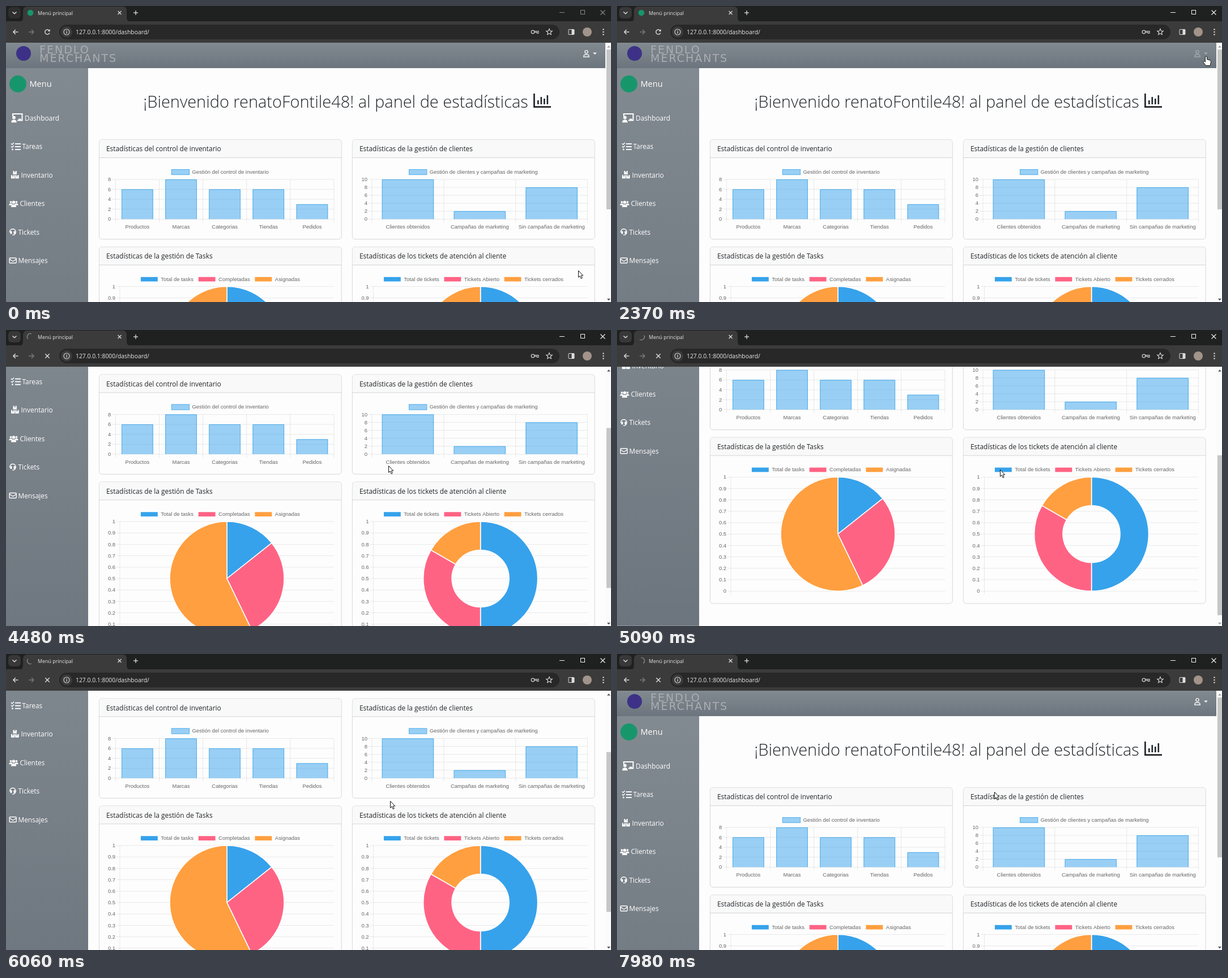
Recreate the animation shown at these times as an HTML page with a canvas. Size 1068 by 524 pixels, loop 8 s.

```html
<!DOCTYPE html>
<html lang="es">
<head>
<meta charset="utf-8">
<title>Menú principal</title>
<style>
html, body { margin: 0; width: 100%; height: 100%; overflow: hidden; background: #1f1f1f; }
canvas { display: block; }
</style>
</head>
<body>
<canvas id="stage" width="1068" height="524"></canvas>
<script>
const c = document.getElementById('stage').getContext('2d');
const LOOP = 8000, TAU = Math.PI * 2;
const UI = '"Open Sans", "Noto Sans", sans-serif';
const ARIAL = '"Liberation Sans", Arial, sans-serif';
const USER = 'renatoFontile48';
const INK = '#212529', BLUE = '#36a2eb', PINK = '#ff6384', ORANGE = '#ff9f40';
const PX = 0.7875; // the page is shown at this zoom
const NOTCH = 100 * PX;
const LEFT = 164, RIGHT = 611, HALF = 214;

// [time, x, y] of the pointer tip
const POINTER = [
  [0, 1010, 468], [70, 1010, 469], [300, 1009, 471], [510, 1008, 473], [790, 1007, 472],
  [900, 980, 435], [1050, 870, 370], [1200, 722, 322], [1300, 780, 310], [1400, 880, 276],
  [1480, 950, 215], [1530, 995, 155], [1620, 1000, 148], [1850, 1026, 122], [2220, 1040, 89],
  [2900, 1040, 89], [3490, 998, 144], [3850, 998, 144], [4400, 675, 240], [4900, 675, 240],
  [5450, 678, 260], [6200, 678, 260], [6610, 667, 243], [7000, 666, 244]
];
// [time, wheel notches]
const SCROLL = [
  [3950, 0], [4300, 2], [4600, 2], [4800, 3], [5200, 3], [5400, 2], [6690, 2], [6980, 0]
];

const smooth = k => k * k * (3 - 2 * k);

function at(keys, t, ease = k => k) {
  if (t <= keys[0][0]) return keys[0].slice(1);
  for (let i = 1; i < keys.length; i++) {
    const a = keys[i - 1], b = keys[i];
    if (t < b[0]) {
      const k = ease((t - a[0]) / (b[0] - a[0]));
      return a.slice(1).map((v, j) => v + (b[j + 1] - v) * k);
    }
  }
  return keys[keys.length - 1].slice(1);
}

function text(s, x, y, size, color, font = UI, align = 'left', weight = 400) {
  c.font = `${weight} ${size}px ${font}`;
  c.textAlign = align;
  c.fillStyle = color;
  c.fillText(s, x, y);
}
const label = (s, x, mid, align) => text(s, x, mid + 3.4, 9.45, '#666', ARIAL, align);

function rect(x, y, w, h, color) {
  c.fillStyle = color;
  c.fillRect(x, y, w, h);
}

function round(x, y, w, h, r, fill, stroke, width = 1) {
  c.beginPath();
  c.roundRect(x, y, w, h, r);
  if (fill) { c.fillStyle = fill; c.fill(); }
  if (stroke) { c.strokeStyle = stroke; c.lineWidth = width; c.stroke(); }
}

function disc(x, y, r, color) {
  c.beginPath();
  c.arc(x, y, r, 0, TAU);
  c.fillStyle = color;
  c.fill();
}

function ring(x, y, r, color, width = 1.2, from = 0, to = TAU) {
  c.beginPath();
  c.arc(x, y, r, from, to);
  c.strokeStyle = color;
  c.lineWidth = width;
  c.stroke();
}

function line(points, color, width = 1) {
  c.beginPath();
  for (let i = 0; i < points.length; i += 2) c.lineTo(points[i], points[i + 1]);
  c.strokeStyle = color;
  c.lineWidth = width;
  c.stroke();
}

function path(x, y, d, fill, stroke, width = 1) {
  const p = new Path2D(d);
  c.save();
  c.translate(x, y);
  if (fill) { c.fillStyle = fill; c.fill(p); }
  if (stroke) { c.strokeStyle = stroke; c.lineWidth = width; c.stroke(p); }
  c.restore();
}

function person(x, y, s, color) {
  disc(x, y - 3.2 * s, 3 * s, color);
  path(x, y, `M${-5 * s} ${6 * s}Q${-5 * s} ${0.8 * s} 0 ${0.8 * s}Q${5 * s} ${0.8 * s} ${5 * s} ${6 * s}Z`, color);
}

function cross(x, y, r, color, width) {
  line([x - r, y - r, x + r, y + r], color, width);
  line([x - r, y + r, x + r, y - r], color, width);
}

function star(x, y, r, color) {
  c.beginPath();
  for (let i = 0; i < 10; i++) {
    const a = i * Math.PI / 5 - Math.PI / 2, q = i % 2 ? r * 0.45 : r;
    c.lineTo(x + q * Math.cos(a), y + q * Math.sin(a));
  }
  c.closePath();
  c.strokeStyle = color;
  c.lineWidth = 1.1;
  c.stroke();
}

/* ---------- browser frame ---------- */

function browser(t) {
  const active = t >= 2370, loading = t >= 3800;
  const pale = '#dedede', win = active ? '#f4f4f4' : '#8a8a8a';
  rect(0, 0, 1068, 28, '#1f2020');
  rect(0, 27, 1068, 38, '#3b3b3b');

  round(4, 2, 22, 20, 6, active ? '#383838' : '#2e2e2e');
  line([11.5, 10.5, 15, 13.8, 18.5, 10.5], pale, 1.4);
  path(0, 0, 'M23 28Q30 28 30 20V9Q30 1 38 1H206Q213 1 213 9V20Q213 28 220 28Z', '#3b3b3b');
  if (loading) {
    const mid = (215 - 360 * (t - 4480) / 1320) * Math.PI / 180;
    ring(43, 12, 5.6, '#8b8d90', 1.3, mid - 1.3, mid + 1.3);
  } else disc(43, 12, 5.3, '#17966c');
  text('Menú principal', 56, 15.6, 8.9, '#e6e6e6');
  cross(200.5, 12, 3, '#dcdcdc', 1.2);
  line([225, 12, 233, 12], pale, 1.3);
  line([229, 8, 229, 16], pale, 1.3);

  line([977, 11.5, 986, 11.5], win);
  c.strokeStyle = win;
  c.strokeRect(1014.5, 7.5, 7, 7);
  cross(1053.5, 11.5, 4, win, 1.1);

  line([21.5, 46, 13, 46], pale, 1.4);
  line([16.8, 42, 12.8, 46, 16.8, 50], pale, 1.4);
  line([40, 46, 48.5, 46], '#7d7d7d', 1.4);
  line([45, 42, 49, 46, 45, 50], '#7d7d7d', 1.4);
  if (loading) cross(73, 46, 3.7, pale, 1.4);
  else {
    ring(73, 46, 4.2, pale, 1.4, 0.4, 5.5);
    path(74.3, 41, 'M3.4 0V4H-0.6Z', pale);
  }

  round(94, 33, 883, 26, 13, '#282828');
  disc(107, 46, 10, '#3b3b3b');
  ring(107, 46, 5, pale, 1.1);
  rect(106.4, 45.3, 1.3, 3.3, pale);
  rect(106.4, 43.2, 1.3, 1.3, pale);
  text('127.0.0.1:8000/dashboard/', 123, 49.6, 10.35, '#e8e8e8');

  ring(930, 46, 2.8, '#c6c6c6', 1.3);
  path(933, 44.6, 'M0 0H7V3.6H4.4V2H0', null, '#c6c6c6', 1.2);
  star(959, 46, 5.6, pale);
  round(993, 41.5, 10, 9, 1, null, pale);
  rect(998.5, 41.5, 4.5, 9, pale);
  disc(1026, 46, 8, '#a2948a');
  for (const y of [41.5, 46, 50.5]) disc(1054.5, y, 1.2, pale);
}

/* ---------- page ---------- */

function shade(x, y, w, h) {
  const g = c.createLinearGradient(0, y, 0, y + h);
  g.addColorStop(0, '#828a91');
  g.addColorStop(1, '#6c757d');
  rect(x, y, w, h, g);
}

function navbar(t) {
  shade(0, 65, 1058, 45);
  disc(31, 84, 13, '#3c3187');
  c.letterSpacing = '2px';
  const type = '"DejaVu Sans", sans-serif';
  text('FENDLO', 59, 84, 19, '#aaaeb1', type);
  text('MERCHANTS', 59, 99, 19, '#aaaeb1', type);
  c.letterSpacing = '0px';

  const color = t < 2180 || t >= 3850 ? '#f3f4f5' : t < 2630 ? '#a3a8ad' : '#14171a';
  ring(1024.5, 81.2, 2.6, color, 1.4);
  path(1024.5, 90, 'M-4.8 0Q-4.8-4-1.5-4H1.5Q4.8-4 4.8 0Z', null, color, 1.4);
  path(1036, 82.5, 'M0 0H7L3.5 3.6Z', color);
}

function sidebar() {
  const w = '#fff';
  shade(0, 110, 145, 650);
  disc(21, 138, 15, '#17966c');
  text('Menu', 41.5, 142.5, 14.5, w);
  const items = [['Dashboard', 33], ['Tareas', 28.5], ['Inventario', 26.5], ['Clientes', 24.5], ['Tickets', 21.5], ['Mensajes', 21.5]];
  items.forEach(([s, x], i) => text(s, x, 203 + i * 50.4, 11.85, w));

  line([12, 195, 12, 191, 28.5, 191, 28.5, 202.5, 20, 202.5], w, 2);
  rect(22, 199.5, 4.5, 3, w);
  person(14, 200.5, 0.95, w);

  for (let i = 0; i < 3; i++) {
    const y = 244 + i * 5;
    rect(16, y - 0.9, 10, 1.9, w);
    if (i < 2) line([9, y - 0.5, 10.8, y + 1.3, 14, y - 2], w, 1.4);
    else disc(11.5, y, 1.4, w);
  }

  for (const [x, y] of [[12.5, 292], [9, 299.3], [16.3, 299.3]]) {
    rect(x, y, 6.4, 6, w);
    rect(x + 2.3, y, 1.8, 2.4, '#7a8289');
  }

  person(8.5, 349, 0.62, w);
  person(18.5, 349, 0.62, w);
  person(13.5, 350.5, 0.92, w);

  ring(12, 400, 5.3, w, 1.4, Math.PI * 0.95, TAU * 1.12);
  round(7.5, 398.5, 3, 5, 1, w);
  round(13.5, 398.5, 3, 5, 1, w);
  line([16.5, 403, 14, 405.3, 11, 405.3], w, 1.3);

  path(6.2, 446, 'M1 0H11Q12 0 12 1V8Q12 9 11 9H1Q0 9 0 8V1Q0 0 1 0ZM0 2L6 6L12 2', null, w, 1.4);
}

function card(x, y, h, title) {
  const edge = '#cbcccd';
  round(x + 0.4, y + 0.4, 2 * HALF - 0.2, h, 5, '#fdfdfd', edge, PX);
  path(x, y, 'M0.8 32V6Q1 0.8 6 0.8H422Q427.4 1 427.4 6V32Z', '#f9f9f9');
  rect(x, y + 32, 2 * HALF, PX, edge);
  text(title, x + 13, y + 21, 11.9, INK);
}

function legend(items, mid, y) {
  c.font = `9.45px ${ARIAL}`;
  const box = 40 * PX, gap = 6 * PX, pad = 10 * PX;
  const widths = items.map(i => box + gap + c.measureText(i[0]).width);
  let x = mid - (widths.reduce((a, b) => a + b) + pad * (items.length - 1)) / 2;
  items.forEach(([s, fill, stroke, width], i) => {
    rect(x, y - 4.7, box, 9.4, fill);
    c.strokeStyle = stroke;
    c.lineWidth = width;
    c.strokeRect(x, y - 4.7, box, 9.4);
    label(s, x + box + gap, y - 0.5);
    x += widths[i] + pad;
  });
}

const GRID = 'rgba(0,0,0,0.1)';
const hline = (x0, x1, y) => rect(x0, y - PX / 2, x1 - x0, PX, GRID);
const vline = (x, y0, y1) => rect(x - PX / 2, y0, PX, y1 - y0, GRID);

function axis(x0, x1, top, bottom, names) {
  names.forEach((s, i) => {
    const y = top + (bottom - top) * i / (names.length - 1);
    hline(x0 - 6, x1, y);
    label(s, x0 - 8, y - 0.3, 'right');
  });
}

function bars(x0, x1, mid, max, title, data) {
  const step = (x1 - x0) / data.length, top = 307, base = 377.3;
  const fill = 'rgba(54,162,235,0.5)', inset = PX / 2;
  const names = [];
  for (let v = max; v >= 0; v -= 2) names.push(String(v));
  axis(x0, x1, top, base, names);
  for (let i = 0; i <= data.length; i++) vline(x0 + i * step, top, base + 6);
  data.forEach(([s, v], i) => {
    const cx = x0 + (i + 0.5) * step, w = step * 0.72, y = base - (base - top) * v / max;
    const l = cx - w / 2 + inset, r = cx + w / 2 - inset;
    rect(cx - w / 2, y, w, base - y, fill);
    line([l, base, l, y + inset, r, y + inset, r, base], BLUE, PX);
    label(s, cx, 391, 'center');
  });
  legend([[title, fill, BLUE, PX]], mid, 294);
}

function pie(x0, x1, mid, hole, data) {
  const cx = (x0 + x1) / 2, cy = 597.5, colors = [BLUE, PINK, ORANGE];
  const names = [];
  for (let i = 10; i >= 0; i--) names.push(String(i / 10));
  axis(x0, x1, 496.5, 698.5, names);
  vline(x0, 496.5, 704.5);
  const sum = data.reduce((a, d) => a + d[1], 0);
  let a = -Math.PI / 2;
  data.forEach(([, v], i) => {
    const b = a + TAU * v / sum;
    c.beginPath();
    c.arc(cx, cy, 101, a, b);
    if (hole) c.arc(cx, cy, hole, b, a, true);
    else c.lineTo(cx, cy);
    c.closePath();
    c.fillStyle = colors[i];
    c.fill();
    c.strokeStyle = '#fff';
    c.lineWidth = 2 * PX;
    c.stroke();
    a = b;
  });
  legend(data.map((d, i) => [d[0], colors[i], '#fff', 2 * PX]), mid, 483.7);
}

function content() {
  text(`¡Bienvenido ${USER}! al panel de estadísticas`, 582, 180, 28.95, INK, UI, 'center', 300);
  line([932.4, 155, 932.4, 178.6, 962, 178.6], INK, 2.7);
  [[938, 167], [943.5, 161], [949, 164], [954.5, 158]].forEach(([x, y]) => rect(x, y, 2.6, 174 - y, INK));

  card(LEFT, 236, 176.4, 'Estadísticas del control de inventario');
  card(RIGHT, 236, 176.4, 'Estadísticas de la gestión de clientes');
  card(LEFT, 426, 294, 'Estadísticas de la gestión de Tasks');
  card(RIGHT, 426, 294, 'Estadísticas de los tickets de atención al cliente');
  bars(193.3, 579, LEFT + HALF, 8, 'Gestión del control de inventario',
    [['Productos', 6], ['Marcas', 8], ['Categorias', 6], ['Tiendas', 6], ['Pedidos', 3]]);
  bars(646, 1026.6, RIGHT + HALF, 10, 'Gestión de clientes y campañas de marketing',
    [['Clientes obtenidos', 10], ['Campañas de marketing', 2], ['Sin campañas de marketing', 8]]);
  pie(201, 579, LEFT + HALF, 0, [['Total de tasks', 1], ['Completadas', 2], ['Asignadas', 4]]);
  pie(648.6, 1026.6, RIGHT + HALF, 50.5, [['Total de tickets', 3], ['Tickets Abierto', 2], ['Tickets cerrados', 1]]);
}

function menu(y) {
  round(921.5, 102.5, 127, 102, 5, '#fff', '#cfd1d3');
  const hover = y > 134 ? 134 : y > 109 ? 109 : 0;
  if (hover) rect(922, hover, 126, 25, '#f8f9fa');
  person(939.5, 121.2, 1.05, INK);
  text(USER, 949, 125.8, 11.8, INK);
  person(937.5, 147, 0.75, INK);
  person(942.5, 147.3, 0.85, INK);
  disc(946.5, 149.5, 3.4, INK);
  disc(946.5, 149.5, 1.2, '#f8f9fa');
  text('Configuración', 953.6, 151, 11.85, INK);
  rect(922, 165, 126, 1, '#d5d6d8');
  line([939, 180.8, 935, 180.8, 935, 189.3, 939, 189.3], INK, 1.7);
  path(938, 185, 'M0-1.5H4V-4.2L8.5 0L4 4.2V1.5H0Z', INK);
  text('Cerrar sesión', 950, 189.5, 11.75, INK);
}

function scrollbar(s) {
  rect(1058, 65, 10, 459, '#fbfbfb');
  rect(1060, 77 + s * 0.613, 8, 283, '#c6c6c6');
  path(1064, 70, 'M-3 3.5L0 0L3 3.5Z', s ? '#555' : '#a5a5a5');
  path(1064, 518, 'M-3 0L0 3.5L3 0Z', s >= 3 * NOTCH ? '#a5a5a5' : '#555');
}

function status(t) {
  if (t < 3650 || t > 3960) return;
  c.globalAlpha = t < 3760 ? 0.5 : 1;
  round(-4, 512, 152, 20, 4, '#3f4042');
  text('127.0.0.1:8000/change_password/', 4, 522.5, 8.85, '#bfc1c3');
  c.globalAlpha = 1;
}

function pointer(t, x, y) {
  c.lineJoin = 'round';
  if (t > 2130 && t < 3830)
    path(x, y, 'M-1.6 1Q0-1 1.6 1V5.5L7 7Q8.8 7.8 8.4 10.5L7 16.5H-0.5L-5 10.5Q-5.4 8.4-3.6 8.6L-1.6 10Z', '#fff', '#111');
  else
    path(x + 0.5, y + 0.5, 'M0 0V11.8L2.7 9.4L4.7 14L6.7 13.1L4.8 8.6H8.2Z', '#fff', '#111');
  c.lineJoin = 'miter';
}

function draw(t) {
  const scroll = at(SCROLL, t, smooth)[0] * NOTCH;
  const [x, y] = at(POINTER, t).map(Math.round);
  c.save();
  rect(0, 65, 1068, 459, '#fdfdfd');
  c.translate(0, -scroll);
  sidebar();
  content();
  navbar(t);
  if (t >= 2630 && t < 3830) menu(y);
  c.restore();
  scrollbar(scroll);
  status(t);
  browser(t);
  pointer(t, x, y);
}

const start = performance.now();
function tick() {
  draw((performance.now() - start) % LOOP);
  requestAnimationFrame(tick);
}
tick();
</script>
</body>
</html>
```
